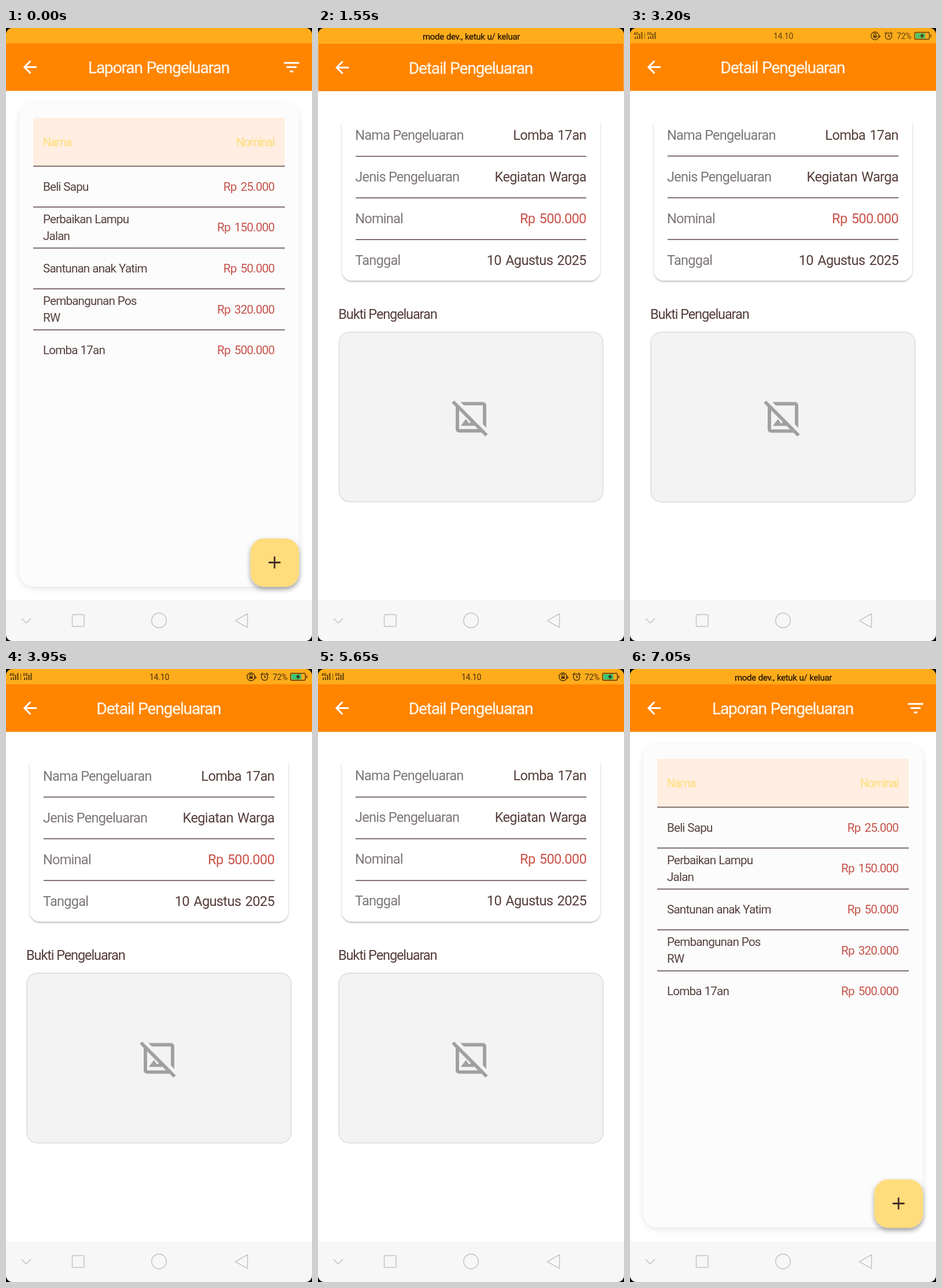
Animation of 529 by 1058 pixels, one loop 7.1 s. Source, as an HTML page:

```html
<!DOCTYPE html>
<html lang="id">
<head>
<meta charset="utf-8">
<title>Laporan Pengeluaran</title>
<style>
  html, body { margin: 0; width: 100%; height: 100%; overflow: hidden; background: #fff; }
  svg { display: block; width: 100vw; height: 100vh; }
  text { font-family: Roboto, "Open Sans", sans-serif; }
  .page { transform-origin: 264.5px 494px; }
  .title { font-size: 28px; letter-spacing: -1.1px; word-spacing: 1px; fill: #fff4e4; stroke: #fff4e4; stroke-width: .3; }
  .head { font-size: 20px; letter-spacing: -1.25px; fill: #ffdf84; stroke: #ffdf84; stroke-width: .3; }
  .cell { font-size: 20.6px; letter-spacing: -.8px; word-spacing: .5px; fill: #56423f; }
  .sum { font-size: 20.6px; letter-spacing: -.8px; word-spacing: 2.7px; fill: #c5524a; }
  .label { font-size: 23.5px; letter-spacing: -.72px; fill: #7d7779; }
  .value { font-size: 23.5px; letter-spacing: -.6px; word-spacing: 2px; fill: #553d3a; }
  .red { fill: #cb5148; }
  .caption { font-size: 23.5px; letter-spacing: -1.1px; fill: #553d3a; }
  .dev { font-size: 15px; letter-spacing: -.3px; word-spacing: .5px; fill: #1f1303; stroke: #1f1303; stroke-width: .25; }
  .small { font-size: 14px; letter-spacing: -.2px; fill: #4a3208; }
  .end { text-anchor: end; }
  .mid { text-anchor: middle; }
  .line { fill: none; stroke: #5b4543; stroke-width: 1.5; }
  .icon { fill: none; stroke: #fff; stroke-width: 3; }
  .nav { fill: none; stroke: #c3c3c3; stroke-width: 1.5; }
</style>
</head>
<body>
<svg viewBox="0 0 529 1058" preserveAspectRatio="none">
  <defs>
    <filter id="soft" x="-10%" y="-10%" width="120%" height="120%">
      <feDropShadow dx="0" dy="3" stdDeviation="6" flood-color="#000" flood-opacity=".1"/>
    </filter>
    <filter id="lift" x="-20%" y="-20%" width="140%" height="150%">
      <feDropShadow dx="0" dy="4" stdDeviation="4" flood-color="#000" flood-opacity=".36"/>
    </filter>
    <filter id="edge" x="-5%" y="-5%" width="110%" height="112%">
      <feDropShadow dx="0" dy="2" stdDeviation="1.7" flood-color="#000" flood-opacity=".27"/>
    </filter>
    <g id="frame">
      <rect width="529" height="988" fill="#fff"/>
      <rect width="529" height="108.500" fill="#ff8400"/>
      <rect width="529" height="26.500" fill="#ffac1c"/>
      <path class="icon" d="M53 67.500H32M42.500 56.800L31.800 67.500L42.500 78.200"/>
    </g>
  </defs>

  <g id="list" class="page">
    <use href="#frame"/>
    <text class="title mid" x="264" y="78">Laporan Pengeluaran</text>
    <path class="icon" d="M480.500 60.200H507M485 67.500H502.500M490.700 74.900H496.600"/>
    <rect x="23" y="130" width="483" height="834" rx="26" fill="#fcfcfc" filter="url(#soft)"/>
    <rect x="47" y="155" width="435" height="83" fill="#ffeee1"/>
    <text class="head" x="64" y="204">Nama</text>
    <text class="head end" x="464" y="204">Nominal</text>
    <g id="rows"></g>
    <rect x="422.500" y="881" width="84" height="83.500" rx="24" fill="#ffdc7c" filter="url(#lift)"/>
    <path d="M454 922.500H474.500M464.250 912.250V932.750" stroke="#4b2c27" stroke-width="2.800"/>
  </g>

  <g id="detail" class="page">
    <use href="#frame"/>
    <text class="title mid" x="264" y="78">Detail Pengeluaran</text>
    <rect x="41" y="150" width="447" height="286" rx="18" fill="#fff" filter="url(#edge)"/>
    <g id="facts"></g>
    <text class="caption" x="35" y="502">Bukti Pengeluaran</text>
    <rect x="36" y="525" width="457" height="293" rx="18" fill="#f3f3f3" stroke="#e1e1e1" stroke-width="1.800"/>
    <path transform="translate(229.200 636.800) scale(2.940)" fill="#a0a0a0" fill-rule="evenodd"
      d="M.69 3.510L2.100 2.100L21.900 21.900L20.480 23.310L18.170 21H5A2 2 0 0 1 3 19V5.830ZM5 7.830V19H16.170L14.170 17H6L9 13L11 15.720L11.840 14.670ZM5.830 3H19A2 2 0 0 1 21 5V18.170L19 16.170V5H7.830Z"/>
  </g>

  <text id="dev" class="dev mid" x="265" y="19.500">mode dev., ketuk u/ keluar</text>
  <g id="status">
    <g id="signals"></g>
    <path d="M25.500 8V19" stroke="#76530f"/>
    <text class="small mid" x="265" y="19">14.10</text>
    <g fill="none" stroke="#4a3208" stroke-width="1.400">
      <circle cx="423.500" cy="13.500" r="6.800"/>
      <path d="M421.500 13V11A2 2 0 0 1 425.500 11V13M431 12V17M428.500 14.500H433.500"/>
      <circle cx="447" cy="14" r="5.600"/>
      <path d="M447 10.500V14.500H450M440 10L444 6.500M454 10L450 6.500"/>
      <rect x="492" y="7.500" width="25.500" height="12" rx="2"/>
      <path d="M520 11V16"/>
    </g>
    <rect x="420.500" y="13" width="6" height="4" fill="#4a3208"/>
    <text class="small end" x="486.500" y="18.500">72%</text>
    <rect x="493.500" y="9" width="17" height="9" fill="#38c878"/>
    <path d="M507 8.500L500.500 14.200H504.500L503 18.500L509.500 12.800H505.500Z" fill="#30280c"/>
  </g>

  <rect y="988" width="529" height="70" fill="#f7f7f7"/>
  <g class="nav">
    <path d="M27 1019L35 1027L43 1019"/>
    <rect x="114.500" y="1012.500" width="20.500" height="20.500" rx="1.500"/>
    <circle cx="264.500" cy="1022.500" r="12.800"/>
    <path d="M396.500 1022.800L417.500 1010.800V1034.800Z" stroke-linejoin="round"/>
  </g>
  <path fill="#000" fill-rule="evenodd" d="M0 0H529V1058H0ZM11 0A11 11 0 0 0 0 11V1047A11 11 0 0 0 11 1058H518A11 11 0 0 0 529 1047V11A11 11 0 0 0 518 0Z"/>
</svg>
<script>
const LOOP = 7100;
const $ = id => document.getElementById(id);
const text = (cls, x, y, s) => `<text class="${cls}" x="${x}" y="${y}">${s}</text>`;
const rule = (x1, x2, y) => `<path class="line" d="M${x1} ${y}H${x2}"/>`;

const ROW = 70.6;
const expenses = [
  [['Beli Sapu'], '25.000'],
  [['Perbaikan Lampu', 'Jalan'], '150.000'],
  [['Santunan anak Yatim'], '50.000'],
  [['Pembangunan Pos', 'RW'], '320.000'],
  [['Lomba 17an'], '500.000'],
];
$('rows').innerHTML = expenses.map(([lines, sum], i) => {
  const base = 280.8 + i * ROW;
  const first = base - (lines.length - 1) * 14.5;
  return rule(47, 482, 238.5 + i * ROW)
    + lines.map((s, n) => text('cell', 64, first + n * 29, s)).join('')
    + text('sum end', 464, base, 'Rp ' + sum);
}).join('');

const facts = [
  ['Nama Pengeluaran', 'Lomba 17an'],
  ['Jenis Pengeluaran', 'Kegiatan Warga'],
  ['Nominal', 'Rp 500.000'],
  ['Tanggal', '10 Agustus 2025'],
];
$('facts').innerHTML = facts.map(([label, value], i) => {
  const y = 192.5 + i * 72;
  return text('label', 64, y, label)
    + text('value end' + (i === 2 ? ' red' : ''), 464, y, value)
    + (i < 3 ? rule(65, 464, y + 28.5) : '');
}).join('');

$('signals').innerHTML = [['4G', 7], ['2G', 30]].map(([net, x]) =>
  `<text x="${x - 1}" y="12" font-size="7" font-weight="700" fill="#4a3208">${net}</text>`
  + [4, 5, 9, 12].map((h, i) =>
    `<path d="M${x + 2 + i * 3.8} 19V${19 - h}" stroke="#4a3208" stroke-width="1.800"/>`).join('')
).join('');

// Steps are [time in ms, value, easing towards the next step].
function play(id, prop, steps) {
  const all = [[0, steps[0][1]], ...steps, [LOOP, steps[steps.length - 1][1]]];
  $(id).animate(
    all.map(([t, v, easing = 'linear']) => ({ offset: t / LOOP, [prop]: v, easing })),
    { duration: LOOP, iterations: Infinity });
}

const ease = 'cubic-bezier(.2,0,0,1)';
const OPEN = 1300, CLOSE = 5650, SPAN = 300;

play('detail', 'opacity', [[OPEN + 37, 0], [OPEN + 90, 1], [CLOSE + 37, 1], [CLOSE + 100, 0]]);
play('detail', 'transform', [
  [OPEN, 'scale(.85)', ease], [OPEN + SPAN, 'scale(1)'],
  [CLOSE, 'scale(1)', ease], [CLOSE + SPAN, 'scale(.9)'],
]);
play('list', 'transform', [
  [OPEN, 'scale(1)', ease], [OPEN + SPAN, 'scale(1.05)'],
  [CLOSE, 'scale(1.1)', ease], [CLOSE + SPAN, 'scale(1)'],
]);
play('dev', 'opacity', [[30, 0], [180, 1], [2900, 1], [3040, 0], [6130, 0], [6280, 1]]);
play('status', 'opacity', [[3070, 0], [3220, 1], [5950, 1], [6105, .02], [6120, 0]]);
</script>
</body>
</html>
```
